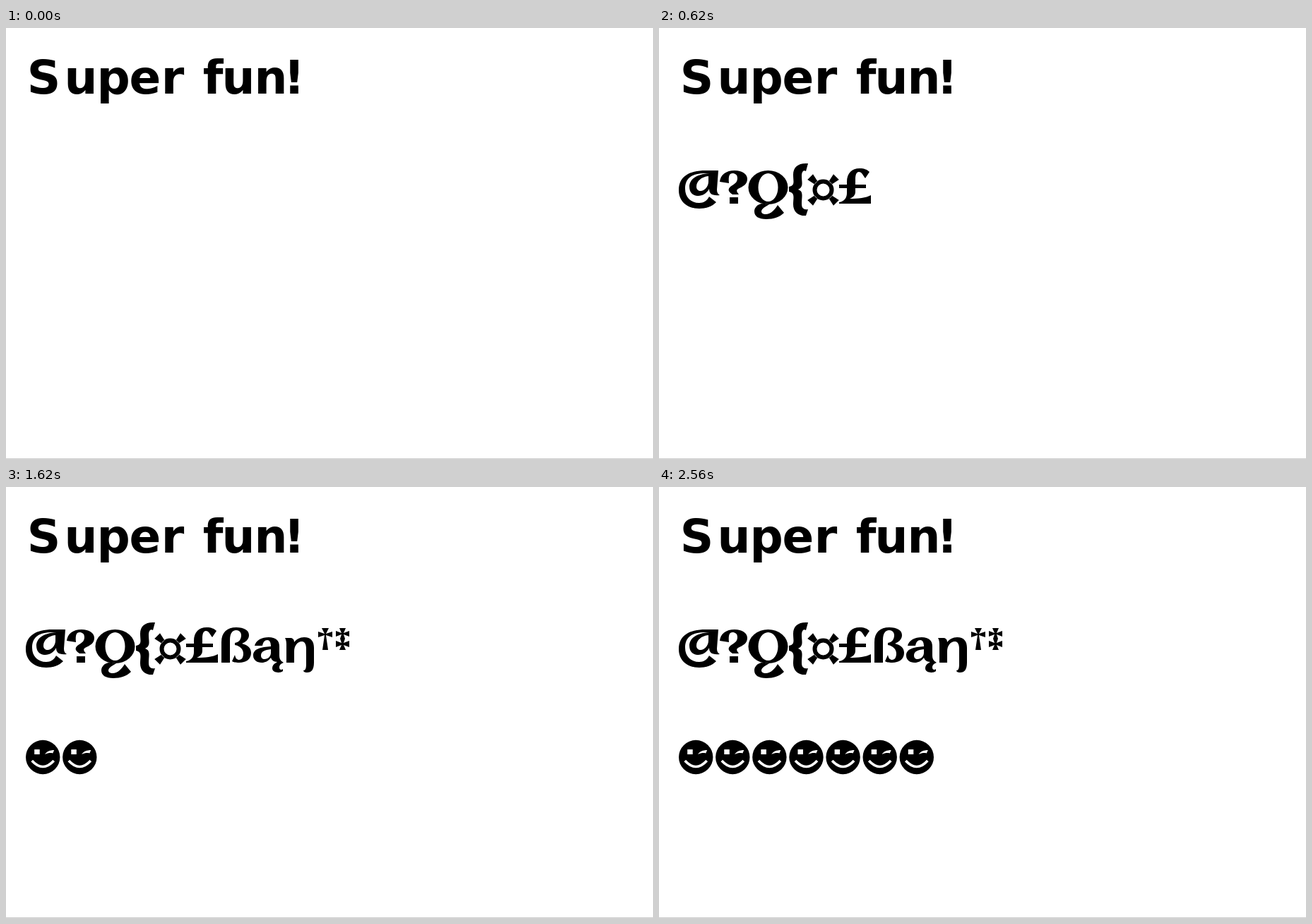
Animation, 916 px wide and 611 px high, one loop 2600 ms. Source, as an HTML page:

```html
<!DOCTYPE html>
<html lang="en">
<head>
<meta charset="utf-8">
<title>Typing</title>
<style>
html, body { margin: 0; width: 100%; height: 100%; overflow: hidden; background: #fff; }
svg { display: block; width: 916px; height: 611px; }
text { font: bold 66px "DejaVu Sans", Verdana, sans-serif; text-anchor: middle; }
path { fill-rule: evenodd; }
</style>
</head>
<body>
<svg id="stage" viewBox="0 0 916 611" xmlns="http://www.w3.org/2000/svg">
  <defs>
    <g id="smiley">
      <circle r="24.2"/>
      <rect x="-12" y="-11" width="7.5" height="7" fill="#fff"/>
      <path d="M3 -4C5 -8 10 -10 16 -10L14 -5.5C11 -6.5 7 -6 3 -4Z" fill="#fff"/>
      <path d="M-15.5 5Q0 22 15.5 5" fill="none" stroke="#fff" stroke-width="3.6"/>
    </g>
  </defs>
  <rect y="610" width="916" height="1" fill="#cfcfcf"/>
  <text x="53.5 106 152 197 236 265 293 329 375 408" y="93">Super fun!</text>
  <g id="signs" role="img" aria-label="@?Q{¤£ßąŋ†‡"></g>
  <g id="faces"></g>
  <rect id="caret" width="1.7" height="91.5"/>
</svg>
<script>
const LOOP = 2600;
const $ = id => document.getElementById(id);

function add(parent, tag, attrs) {
  const el = document.createElementNS("http://www.w3.org/2000/svg", tag);
  for (const k in attrs) el.setAttribute(k, attrs[k]);
  return parent.appendChild(el);
}

const oval = (x, y, rx, ry) =>
  `M${x - rx} ${y}a${rx} ${ry} 0 1 0 ${2 * rx} 0a${rx} ${ry} 0 1 0 ${-2 * rx} 0Z`;

// Four flared arms around a ring
function currency(cx, cy) {
  let d = oval(cx, cy, 15, 15) + oval(cx, cy, 9, 9);
  for (let i = 0; i < 4; i++) {
    const a = Math.PI / 4 + i * Math.PI / 2, c = Math.cos(a), s = Math.sin(a);
    const at = (r, w) => `${cx + r * c - w * s} ${cy + r * s + w * c}`;
    d += `M${at(14.4, -3)}L${at(26, -5.5)} ${at(26, 5.5)} ${at(14.4, 3)}Z`;
  }
  return d;
}

const shapes = {
  at: "M84 202H66C42 202 28 211 28 230C28 246 40 256 57 256C67 256 75 253 81 247L71 239C68 245 63 248 57 248" +
      "C45 248 37 240 37 228C37 213 46 206 66 206H72C51 207 43 216 43 225C43 233 48 238 55 238C62 238 68 234 71 228" +
      "C71 235 75 238 86 237C83 235 82 233 82 229Z" +
      "M70 210C60 211 53 217 53 225C53 229 56 231 59 231C64 231 70 225 70 218Z",
  question: "M86 218C87 208 95 202 107 202C118 202 125 207 125 214C125 222 118 225 112 228C109 230 110 232 113 236" +
      "H104C98 232 97 229 101 225C107 221 111 219 111 213C111 208 108 206 104 206C100 206 98 209 99 220ZM100 240H112V249H100Z",
  capQ: oval(154.5, 226, 28, 24) + oval(154.5, 226, 14, 20) +
      "M145 249L156 250C149 254 145 257 145 260C145 264 151 265 156 263C161 261 165 256 168 251" +
      "L177 262C171 268 162 271 152 271C141 271 135 267 135 260C135 254 140 250 145 249Z",
  brace: "M211 192C197 191 190 197 190 208C190 218 193 223 184 225V232C193 234 190 240 190 250C190 261 198 267 208 266" +
      "L211 257C204 258 202 255 202 249C202 238 205 232 197 229C205 225 202 219 202 210C202 203 205 201 208 203Z",
  currency: currency(232.5, 229.5),
  pound: "M255 249V247C262 246 266 241 266 234V227H255V222H266V218C266 206 273 199 284 199C291 199 295 201 298 204" +
      "L292 213C289 209 287 204 283 204C279 204 278 209 278 215V222H293V227H278V232C278 237 275 240 270 242" +
      "C282 242 293 241 300 237V249Z",
  eszett: "M305 249V220C305 206 313 199 326 199C337 199 344 203 344 210C344 217 338 220 334 222C343 224 347 229 347 235" +
      "C347 244 340 249 330 249C325 249 321 248 320 247L324 238C325 243 327 245 330 245C334 245 336 241 336 236" +
      "C336 230 331 225 324 224V221C330 220 333 216 333 210C333 206 330 203 326 203C320 203 317 208 317 217V249Z",
  aOgonek: "M352 225C354 217 362 213 372 213C382 213 387 218 387 226V238C387 243 388 246 393 249C388 251 387 253 387 256" +
      "C387 259 390 260 392 258V261C389 264 377 264 377 257C377 252 381 250 384 248C379 248 376 245 375 242" +
      "C371 247 367 249 362 249C355 249 350 245 350 239C350 229 361 227 375 226C375 220 373 217 370 217" +
      "C366 217 364 220 363 225ZM375 230C366 231 361 233 361 239C361 242 363 244 366 244C371 244 375 240 375 235Z",
  eng: "M397 249V223C397 218 396 216 395 214H404C407 215 408 217 408 220C411 216 416 213 422 213C432 213 436 219 436 228" +
      "V249C436 258 433 263 426 263C423 263 421 262 421 260C424 260 425 257 425 251V230C425 223 423 219 419 219" +
      "C412 219 408 226 408 233V249Z",
  dagger: "M447 200H457L453 208 462 205V213L453 210 456 231H448L451 210 442 213V205L451 208Z",
  doubleDagger: "M472 200H481L478 207 486 204V212L478 209 480 215 478 221 486 218V227L478 224 481 231H472L475 224 " +
      "467 227V218L475 221 473 215 475 209 467 212V204L475 207Z"
};

const signTimes = [120, 240, 320, 400, 500, 620, 720, 820, 960, 1100, 1380];
const faceTimes = [1480, 1620, 1700, 1840, 1940, 2060, 2180];
const pitch = 52.1;

const signs = Object.values(shapes).map(d => add($("signs"), "path", { d }));
const faces = faceTimes.map((_, i) =>
  add($("faces"), "use", { href: "#smiley", x: 52.2 + i * pitch, y: 383 }));

// Caret flashes: start, end, x, y
const afterFace = n => 26.2 + n * pitch;
const blinks = [
  [200, 240, 86, 180], [440, 500, 211, 180], [660, 720, 302, 180],
  [880, 960, 393, 180], [1140, 1380, 463.8, 180],
  [1640, 1700, afterFace(2), 337], [1880, 1940, afterFace(4), 337],
  [2100, 2180, afterFace(6), 337], [2340, 2560, afterFace(7), 337]
];

const show = (el, on) => el.setAttribute("visibility", on ? "visible" : "hidden");

function draw() {
  const t = performance.now() % LOOP;
  signs.forEach((el, i) => show(el, t >= signTimes[i]));
  faces.forEach((el, i) => show(el, t >= faceTimes[i]));
  const blink = blinks.find(b => t >= b[0] && t < b[1]);
  show($("caret"), blink);
  if (blink) {
    $("caret").setAttribute("x", blink[2]);
    $("caret").setAttribute("y", blink[3]);
  }
  requestAnimationFrame(draw);
}
draw();
</script>
</body>
</html>
```
